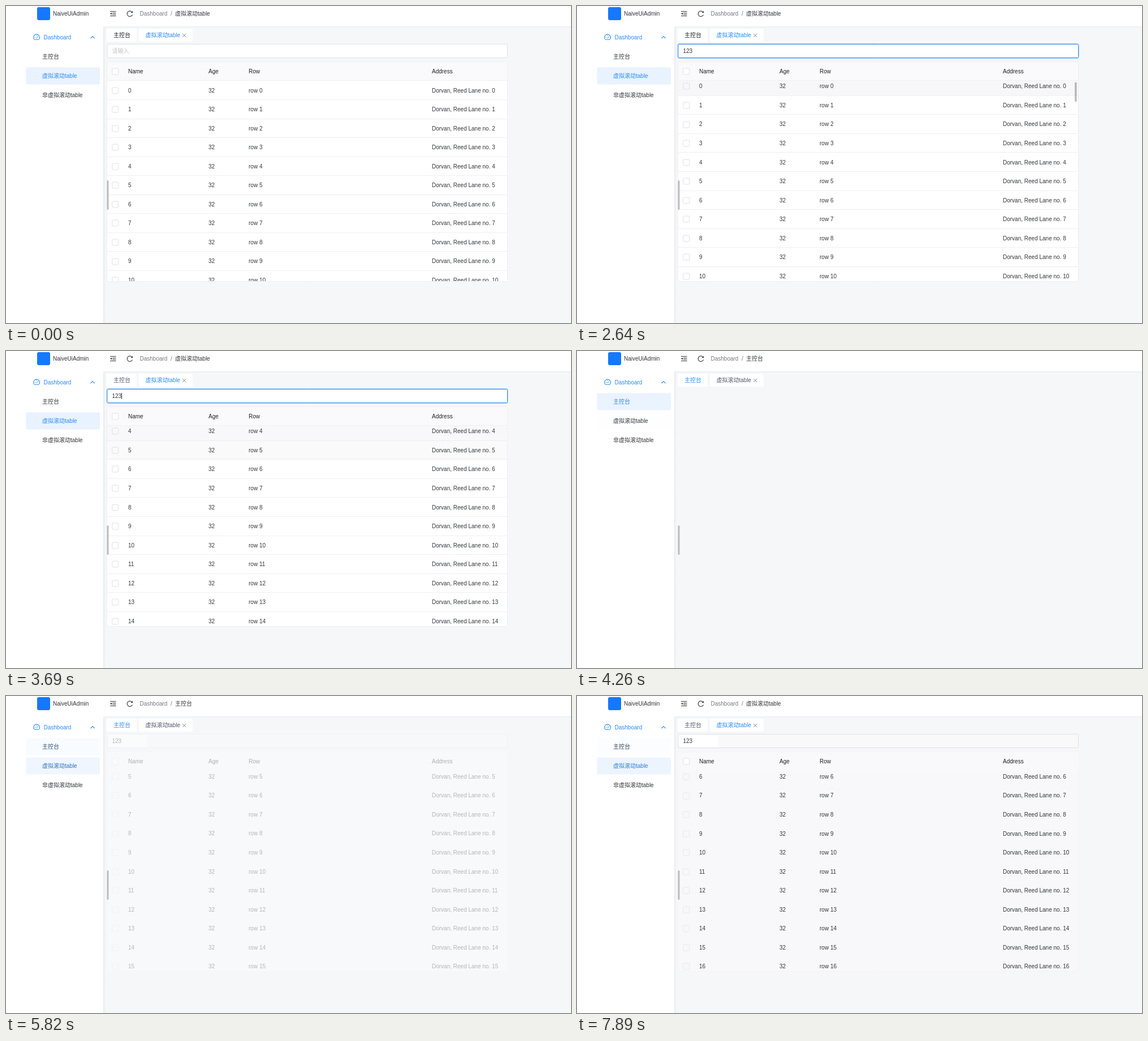
An HTML page with a canvas for the animation above (8000 ms loop, 999x560 px).

```html
<!DOCTYPE html>
<html lang="zh">
<head>
<meta charset="utf-8">
<title>Virtual table</title>
<style>
  html, body { margin: 0; width: 100%; height: 100%; overflow: hidden; background: #f5f7f9; }
  canvas { display: block; }
</style>
</head>
<body>
<canvas id="stage" width="999" height="560"></canvas>
<script>
const ctx = document.getElementById('stage').getContext('2d');
const LOOP = 8000;
const FONT = '10px "Liberation Sans", "Noto Sans CJK SC", "Noto Sans CJK", sans-serif';
const BLUE = '#2d8cf0', INK = '#333639', LINE = '#efeff5', EDGE = '#e0e0e6';
const ROW = 33.55, BODY_TOP = 132, BODY_END = 487;
const COLS = [216, 358, 429, 753];
const VIRTUAL = '虚拟滚动table', CONSOLE = '主控台';

// Visits to the console page: [leave table, come back]
const VISITS = [[4050, 4830], [5730, 6360], [7020, 7710]];
// Caret switches on and off, starting from hidden
const CARET = [660, 1140, 1380, 2280, 2790, 3240, 3690, 4050];

const clamp = v => Math.min(1, Math.max(0, v));
const smooth = v => { v = clamp(v); return v * v * (3 - 2 * v); };
const ramp = (t, start, length) => smooth((t - start) / length);

function mix(a, b, p) {
  const part = (c, i) => parseInt(c.slice(i, i + 2), 16);
  return `rgb(${[1, 3, 5].map(i => Math.round(part(a, i) + (part(b, i) - part(a, i)) * p)).join()})`;
}

function text(s, x, mid, color = INK) {
  ctx.fillStyle = color;
  ctx.fillText(s, x, Math.round(mid + 3.5));
}

function rect(x, y, w, h, color) {
  ctx.fillStyle = color;
  ctx.fillRect(x, y, w, h);
}

function box(x, y, w, h, r, fill, stroke) {
  ctx.beginPath();
  ctx.roundRect(x, y, w, h, r);
  if (fill) { ctx.fillStyle = fill; ctx.fill(); }
  if (stroke) { ctx.strokeStyle = stroke; ctx.lineWidth = 1; ctx.stroke(); }
}

function path(points, color, width = 1) {
  ctx.beginPath();
  points.forEach(([x, y], i) => i ? ctx.lineTo(x, y) : ctx.moveTo(x, y));
  ctx.strokeStyle = color;
  ctx.lineWidth = width;
  ctx.stroke();
}

function arc(x, y, r, from, to, color) {
  ctx.beginPath();
  ctx.arc(x, y, r, from, to);
  ctx.strokeStyle = color;
  ctx.lineWidth = 1.1;
  ctx.stroke();
}

function triangle(a, b, c, color) {
  ctx.beginPath();
  ctx.moveTo(...a);
  ctx.lineTo(...b);
  ctx.lineTo(...c);
  ctx.fillStyle = color;
  ctx.fill();
}

function scene(t) {
  let away = 0, alpha = 1, onConsole = false;
  for (const [out, back] of VISITS) {
    if (t < out) break;
    away = ramp(t, out, 240) - ramp(t, back, 240);
    onConsole = t < back;
    alpha = onConsole ? 1 - ramp(t, out, 150) : ramp(t, back, 90);
  }
  const first = 141.4 * ramp(t, 2608, 242);
  return {
    t, away, alpha, onConsole,
    returned: t >= 4830,
    scroll: t < 4830 ? first : t < 7710 ? 174.4 : 207.95,
    value: t < 1380 ? '' : t < 1470 ? '1' : t < 1770 ? '12' : '123',
    focus: ramp(t, 650, 250) - ramp(t, 4050, 200),
    caret: CARET.filter(c => c <= t).length % 2 === 1,
    bar: ramp(t, 2510, 110) - ramp(t, 3240, 300)
  };
}

function sidebar(s) {
  rect(0, 0, 172, 560, '#fff');
  const shade = ctx.createLinearGradient(172, 0, 176, 0);
  shade.addColorStop(0, 'rgba(29,35,41,.06)');
  shade.addColorStop(1, 'rgba(29,35,41,0)');
  rect(172, 0, 4, 560, shade);

  box(55, 2, 23, 23, 3, '#1677ff');
  text('NaiveUiAdmin', 83, 13.5);

  arc(54, 55.5, 5.4, Math.PI * .78, Math.PI * 2.22, BLUE);
  path([[50, 59.3], [58, 59.3]], BLUE);
  path([[53.5, 57], [56.5, 53.5]], BLUE);
  path([[50.7, 55.5], [52, 55.5]], BLUE);
  path([[54, 52], [54, 53]], BLUE);
  text('Dashboard', 66.5, 55.5, BLUE);
  path([[149.5, 57.2], [153, 53.7], [156.5, 57.2]], BLUE, 1.2);

  const items = [[CONSOLE, 89.5, s.away], [VIRTUAL, 123.5, 1 - s.away], ['非虚拟滚动table', 157.5, 0]];
  for (const [label, mid, on] of items) {
    if (on > 0) box(35.5, mid - 15, 130.5, 30, 2, mix('#ffffff', '#e9f2ff', on));
    text(label, 64, mid, mix(INK, BLUE, on));
  }
}

function topBar(s) {
  rect(172, 0, 827, 36, '#fff');
  rect(172, 36, 827, 1, '#eceef1');
  rect(172, 37, 827, 1, '#f1f3f6');

  for (const [y, x] of [[9.5, 184], [12.3, 188], [14.9, 188], [17.5, 184]]) path([[x, y], [194.5, y]], INK);
  triangle([184, 13.6], [187, 11.6], [187, 15.6], INK);
  arc(219, 13.7, 4.8, Math.PI * .12, Math.PI * 1.78, INK);
  triangle([224, 8.6], [224, 12.3], [220.6, 12], INK);

  text('Dashboard', 236.5, 13.5, '#767c82');
  text('/', 291, 13.5, '#767c82');
  text(s.onConsole ? CONSOLE : VIRTUAL, 299, 13.5);

  box(178, 40, 53, 23, 2, '#fff');
  box(235, 40, 95, 23, 2, '#fff');
  const idle = mix('#1f2225', '#515a6e', ramp(s.t, 3240, 300));
  text(CONSOLE, 190, 51.5, s.onConsole ? BLUE : idle);
  text(VIRTUAL, 246.5, 51.5, s.onConsole ? '#515a6e' : BLUE);
  path([[312.3, 49], [318.3, 55]], '#808695');
  path([[318.3, 49], [312.3, 55]], '#808695');
}

function inputField(s) {
  if (s.focus > 0) box(177.5, 66.5, 710, 26, 3, null, `rgba(45,140,240,${.35 * s.focus})`);
  box(179, 67.5, 707.5, 24, 2, s.returned ? '#f9f9fa' : '#fff');
  if (s.returned) rect(180, 68, 70, 23, '#fff');
  box(179, 67.5, 707.5, 24, 2, null, mix(EDGE, BLUE, s.focus));
  text(s.value || '请输入', 187.5, 79.5, s.value ? INK : '#c2c2c2');
  if (s.caret) {
    const x = Math.floor(187.5 + ctx.measureText(s.value).width);
    rect(x, 74, 1, 11, INK);
  }
}

function rowColor(i, s) {
  if (s.returned) return s.t < 5000 ? '#fafafa' : '#f8f8fa';
  if (s.t < 2520) return '#fff';
  if (s.t < 2730) return i === 0 ? '#f7f7fa' : '#fff';
  return i === 4 ? '#f8f8fa' : i === 5 ? '#fafafa' : '#fff';
}

function table(s) {
  const head = s.returned ? '#f9f9fb' : '#fafafc';
  rect(179, 98, 708, BODY_END - 98, s.returned ? head : '#fff');
  rect(179, 98, 708, BODY_TOP - 98, head);
  box(187.8, 110, 11, 11, 2, '#fff', EDGE);
  ['Name', 'Age', 'Row', 'Address'].forEach((label, i) => text(label, COLS[i], 115.5, '#1f2225'));

  ctx.save();
  ctx.beginPath();
  ctx.rect(179, BODY_TOP, 708, BODY_END - BODY_TOP);
  ctx.clip();
  const start = Math.floor(s.scroll / ROW);
  for (let i = start; i < start + 12; i++) {
    const top = BODY_TOP + .4 + i * ROW - s.scroll;
    const mid = top + 16.6;
    const fill = rowColor(i, s);
    rect(179, Math.round(top), 708, 34, fill);
    if (!s.returned) rect(179, Math.round(top + ROW) - 1, 708, 1, LINE);
    box(187.8, Math.round(mid - 5.4), 11, 11, 2, fill, s.returned ? '#e8e8ed' : EDGE);
    [i, 32, 'row ' + i, 'Dorvan, Reed Lane no. ' + i].forEach((cell, c) => text(cell, COLS[c], mid));
  }
  if (s.bar > 0) box(880, 134 + s.scroll * .085, 3.6, 35, 1.8, `rgba(0,0,0,${.25 * s.bar})`);
  ctx.restore();

  if (!s.returned) rect(179, BODY_TOP - 1, 708, 1, LINE);
  box(178.5, 98.5, 708, 388, 2, null, s.returned ? '#f3f4f7' : LINE);
}

function draw(t) {
  const s = scene(t);
  ctx.font = FONT;
  rect(0, 0, 999, 560, '#f5f7f9');
  sidebar(s);
  topBar(s);
  if (s.alpha > 0) {
    ctx.globalAlpha = s.alpha;
    inputField(s);
    table(s);
    ctx.globalAlpha = 1;
  }
  box(178.5, 308, 3, 52, 1.5, '#bcbcbc');
}

const began = performance.now();
function tick() {
  draw((performance.now() - began) % LOOP);
  requestAnimationFrame(tick);
}
tick();
</script>
</body>
</html>
```
